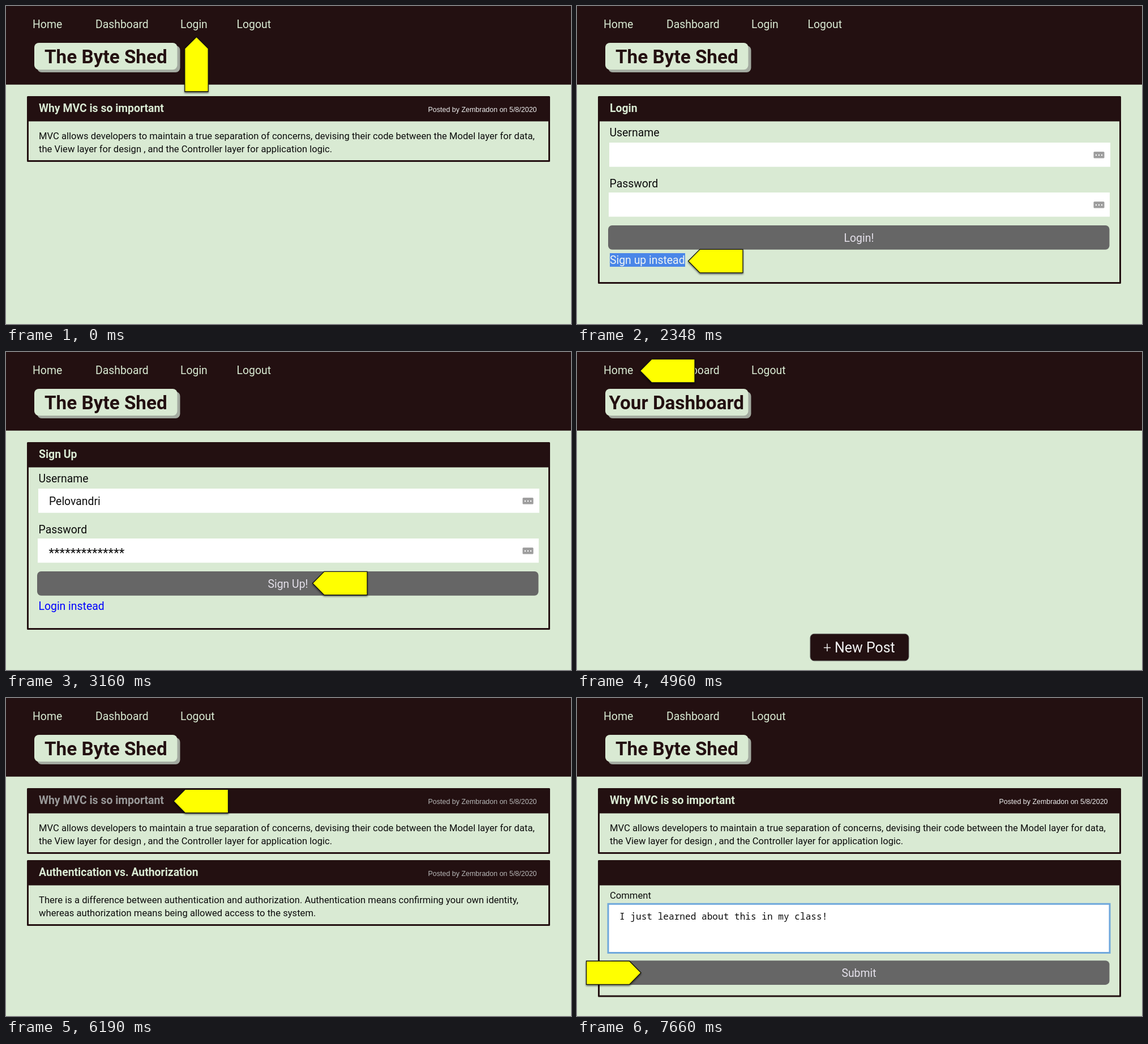
Recreate the animation shown at these times as an HTML page. Size 998 by 561 pixels, loop 8000 ms.

```html
<!DOCTYPE html>
<html lang="en">
<head>
<meta charset="utf-8">
<title>Blog walkthrough</title>
<style>
  html, body { margin: 0; width: 100%; height: 100%; overflow: hidden; background: #d9ead3; }
  svg { display: block; width: 998px; height: 561px; font-family: Roboto, sans-serif; }
  text { white-space: pre; }
  .arrow { filter: drop-shadow(0 2px 1.5px rgba(0, 0, 0, .55)); }
</style>
</head>
<body>
<svg id="stage" viewBox="0 0 998 561"></svg>
<script>
const DARK = '#231011', PALE = '#d9ead3', BLACK = '#0c0c0c', LIGHT = '#e4e0ea';
const S = 16.63, M = 19.4, L = 24.95, XL = 33.27; // text sizes

const text = (x, y, str, size = M, fill = BLACK, attrs = '') =>
  `<text x="${x}" y="${y}" font-size="${size}" fill="${fill}" ${attrs}>${str}</text>`;
const rect = (x, y, w, h, fill, attrs = '') =>
  `<rect x="${x}" y="${y}" width="${w}" height="${h}" fill="${fill}" ${attrs}/>`;

// Pointer whose tip is at (x, y); angle 0 points left.
const arrow = (x, y, angle = 0) => `<g class="arrow"><path
  transform="translate(${x} ${y}) rotate(${angle})" d="M0 0L20.5-20.7H96.5V20.7H20.5Z"
  fill="#ff0" stroke="#111" stroke-width="1.3"/></g>`;

function header(title, titleX, loggedIn) {
  const links = loggedIn
    ? [['Home', 48], ['Dashboard', 159], ['Logout', 309]]
    : [['Home', 48], ['Dashboard', 159], ['Login', 309], ['Logout', 408.5]];
  return rect(0, 0, 998, 138.7, DARK)
    + links.map(([label, x]) => text(x - 1, 38.5, label, M, PALE)).join('')
    + rect(55, 70, 252.5, 47, '#a3aaa0', 'rx="8"')
    + rect(50, 65, 252.5, 47.3, PALE, 'rx="8"')
    + text(titleX, 101, title, XL, DARK, 'font-weight="700"');
}
const blogHeader = loggedIn => header('The Byte Shed', 68, loggedIn);

const panel = (y, h, title = '', titleColor = PALE) =>
  rect(38.5, y + 1.5, 921, h - 3, 'none', `stroke="${DARK}" stroke-width="3" stroke-linejoin="round"`)
  + rect(38, y + 1, 922, 43.5, DARK)
  + text(58, y + 28, title, M, titleColor, 'font-weight="700"');

const post = (y, title, lines, titleColor, bylineColor = '#eee') =>
  panel(y, 116, title, titleColor)
  + text(745.5, y + 28, 'Posted by Zembradon on 5/8/2020', 12.47, bylineColor,
      'font-family="Liberation Sans, Arial, sans-serif"')
  + lines.map((line, i) => text(58, y + 76 + i * 23, line, S)).join('');

const mvcPost = (titleColor, bylineColor) => post(159, 'Why MVC is so important', [
  'MVC allows developers to maintain a true separation of concerns, devising their code between the Model layer for data,',
  'the View layer for design , and the Controller layer for application logic.'
], titleColor, bylineColor);

const button = (y, label) => rect(55, y, 885.5, 42.7, '#666', 'rx="7"')
  + text(498, y + 28.5, label, M, LIGHT, 'text-anchor="middle"');

const field = (x, y) => rect(x, y, 885, 42.7, '#fff')
  + rect(912.5, y + 16, 19, 11.5, '#9e9e9e', 'rx="1.5"')
  + [917, 922, 927].map(cx => `<circle cx="${cx}" cy="${y + 22}" r="1.2" fill="#fff"/>`).join('');

const form = (title, action) => blogHeader(false) + panel(159, 331, title)
  + text(57.5, 230, 'Username') + field(57, 241)
  + text(57.5, 320, 'Password') + field(56, 329)
  + button(387, action);

const scenes = [
  [0, () => blogHeader(false) + mvcPost() + arrow(336.5, 54.5, 90)],
  [1130, () => form('Login', 'Login!')
    + rect(58, 436, 133, 24, '#4a86e8')
    + text(58, 455.3, 'Sign up instead', M, '#eef3f3') + arrow(196.5, 450)],
  [3160, () => form('Sign Up', 'Sign Up!')
    + text(76, 269.7, 'Pelovandri')
    + text(75.5, 362, '*'.repeat(14), 22.2)
    + text(57.5, 455.3, 'Login instead', M, '#00f') + arrow(541.5, 408)],
  [4960, () => header('Your Dashboard', 56.5, true)
    + rect(412, 497.3, 174, 47.5, DARK, 'rx="7" stroke="#595959"')
    + text(435, 530.2, '+', L, '#f3f3f3', 'font-weight="300"')
    + text(455, 530.2, 'New Post', L, '#f3f3f3') + arrow(111.5, 33.3)],
  [6190, () => blogHeader(true) + mvcPost('#999', '#b7b7b7')
    + post(286, 'Authentication vs. Authorization', [
      'There is a difference between authentication and authorization. Authentication means confirming your own identity,',
      'whereas authorization means being allowed access to the system.'
    ], PALE, '#b7b7b7') + arrow(296, 182)],
  [7660, () => blogHeader(true) + mvcPost() + panel(286, 241.5)
    + text(58, 353.5, 'Comment', S)
    + rect(55, 363.3, 886, 86.2, '#fff', 'stroke="#6fa8dc" stroke-width="3"')
    + text(75, 391, 'I just learned about this in my class!', 16.13, BLACK,
        'font-family="Noto Sans Mono, monospace"')
    + button(463.2, 'Submit') + arrow(113, 484.7, 180)]
];

const stage = document.getElementById('stage');
const start = performance.now();
let shown;

function draw() {
  const time = (performance.now() - start) % 8000;
  const scene = scenes.findLast(([from]) => from <= time);
  if (scene !== shown) {
    stage.innerHTML = scene[1]();
    shown = scene;
  }
  requestAnimationFrame(draw);
}
draw();
</script>
</body>
</html>
```
